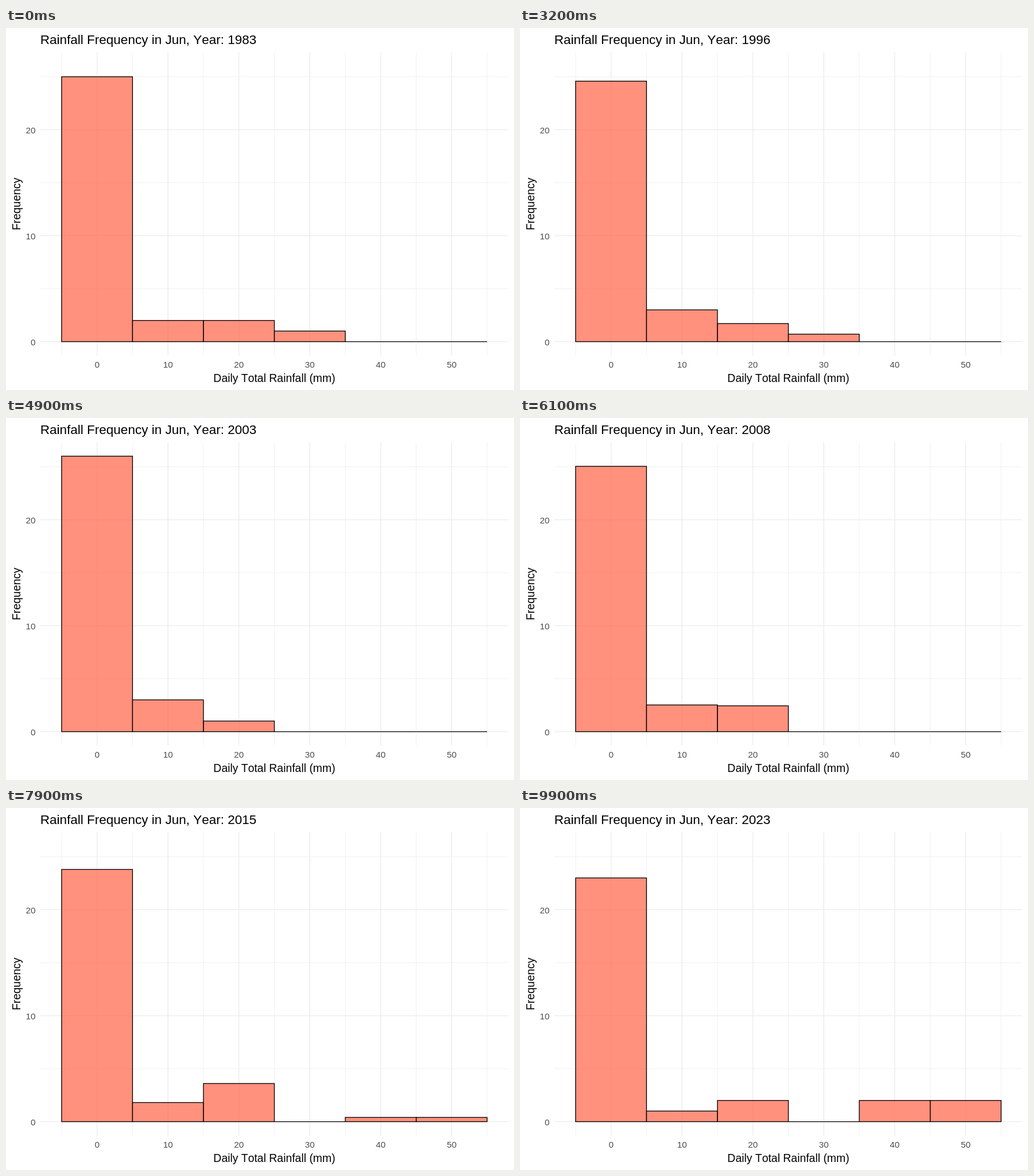
Animation of 885x632 px, one loop 10 s. Source, as an HTML page with a canvas:

```html
<!DOCTYPE html>
<html lang="en">
<head>
<meta charset="utf-8">
<title>Rainfall Frequency</title>
<style>
  html, body { margin: 0; width: 100%; height: 100%; overflow: hidden; background: #fff; }
  canvas { display: block; width: 885px; height: 632px; }
</style>
</head>
<body>
<canvas id="chart" width="885" height="632"></canvas>
<script>
const ctx = document.getElementById('chart').getContext('2d', { alpha: false });
const FONT = '"Liberation Sans", Arial, sans-serif';
const STEPS = 100, STEP_MS = 100;
const FIRST_YEAR = 1983, LAST_YEAR = 2023;
const panel = { left: 59.8, right: 875.2, top: 42.6, bottom: 571.7 };

// Bin counts per decade, each placed at the step where it is reached
const keys = [
  { step: 0,  bins: [25, 2, 2, 1, 0, 0] },
  { step: 25, bins: [24, 3, 2, 1, 0, 0] },
  { step: 49, bins: [26, 3, 1, 0, 0, 0] },
  { step: 74, bins: [24, 2, 4, 0, 0, 0] },
  { step: 99, bins: [23, 1, 2, 0, 2, 2] }
];

const xPos = mm => 158.65 + mm * 12.355;
const yPos = count => 547.6 - count * 18.5;

function text(str, x, y, size, color, align) {
  ctx.font = size + 'px ' + FONT;
  ctx.fontKerning = 'none';
  ctx.fillStyle = color;
  ctx.textAlign = align;
  ctx.fillText(str, x, y);
}

function line(x1, y1, x2, y2, width) {
  ctx.lineWidth = width;
  ctx.beginPath();
  ctx.moveTo(x1, y1);
  ctx.lineTo(x2, y2);
  ctx.stroke();
}

const vLine = (mm, width) => line(xPos(mm), panel.top, xPos(mm), panel.bottom, width);
const hLine = (count, width) => line(panel.left, yPos(count), panel.right, yPos(count), width);

function drawGrid() {
  ctx.strokeStyle = '#ebebeb';
  for (let mm = -5; mm <= 55; mm += 10) vLine(mm, 0.75);
  for (let n = 5; n <= 25; n += 10) hLine(n, 0.75);
  for (let mm = 0; mm <= 50; mm += 10) vLine(mm, 1.35);
  for (let n = 0; n <= 20; n += 10) hLine(n, 1.35);
}

function drawLabels(year) {
  text('Rainfall Frequency in Jun, Year: ' + year, 59.8, 28, 22.5, '#000', 'left');
  for (let mm = 0; mm <= 50; mm += 10) text(mm, xPos(mm), 592.5, 15.3, '#4d4d4d', 'center');
  for (let n = 0; n <= 20; n += 10) text(n, 51.5, yPos(n) + 6, 15.3, '#4d4d4d', 'right');
  text('Daily Total Rainfall (mm)', 467.5, 618, 19.4, '#000', 'center');
  ctx.save();
  ctx.translate(25, 307.2);
  ctx.rotate(-Math.PI / 2);
  text('Frequency', 0, 0, 19.4, '#000', 'center');
  ctx.restore();
}

function binsAt(step) {
  const i = Math.max(1, keys.findIndex(k => k.step >= step));
  const a = keys[i - 1], b = keys[i];
  const f = (step - a.step) / (b.step - a.step);
  return a.bins.map((n, j) => n + (b.bins[j] - n) * f);
}

function drawBars(bins) {
  ctx.lineWidth = 1.35;
  ctx.strokeStyle = '#000';
  ctx.fillStyle = 'rgba(255, 99, 71, 0.7)';
  bins.forEach((n, i) => {
    const x = xPos(i * 10 - 5), w = xPos(i * 10 + 5) - x;
    const y = yPos(n), h = yPos(0) - y;
    ctx.fillRect(x, y, w, h);
    ctx.strokeRect(x, y, w, h);
  });
}

function draw(step) {
  ctx.fillStyle = '#fff';
  ctx.fillRect(0, 0, 885, 632);
  drawGrid();
  drawBars(binsAt(step));
  const span = LAST_YEAR - FIRST_YEAR;
  drawLabels(Math.round(FIRST_YEAR + span * step / (STEPS - 1)));
}

function tick(now) {
  draw(Math.floor(now / STEP_MS + 1e-6) % STEPS);
  requestAnimationFrame(tick);
}

draw(0);
requestAnimationFrame(tick);
</script>
</body>
</html>
```
